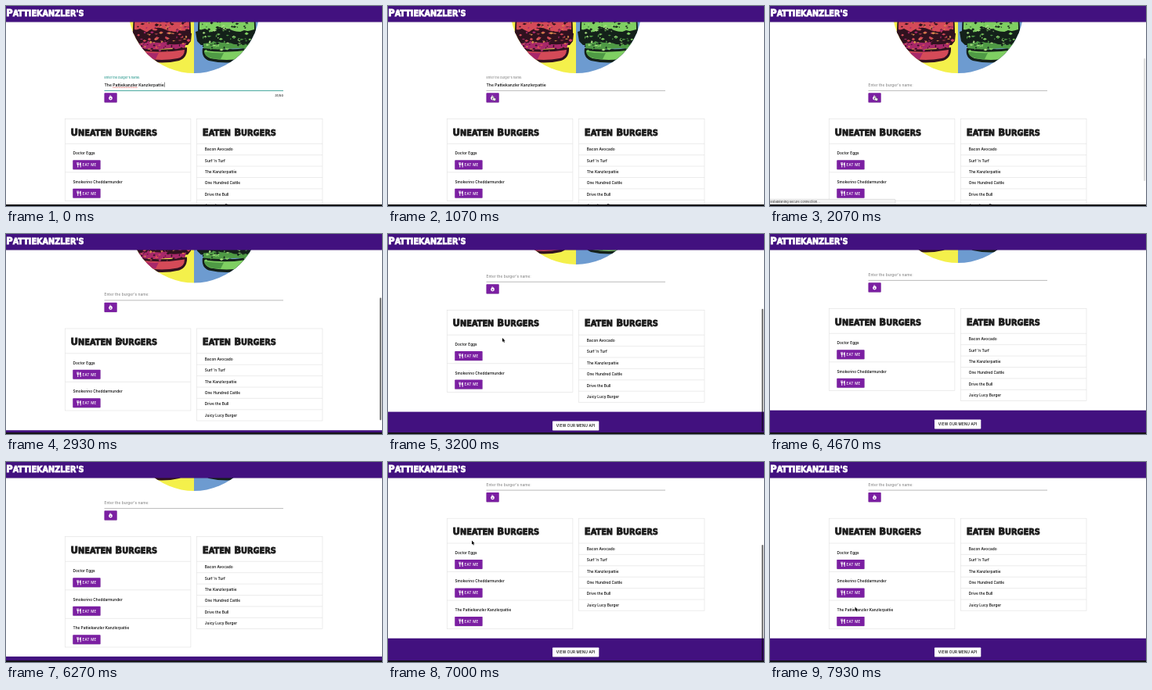
Animation of 480 by 256 pixels, one loop 8000 ms. Source, as an HTML page:

```html
<!DOCTYPE html>
<html lang="en">
<head>
<meta charset="utf-8">
<title>Burger list</title>
<style>
  html, body { margin: 0; width: 100%; height: 100%; overflow: hidden; background: #fff; }
  svg { display: block; width: 480px; height: 256px; }
  text { font: 450 4.8px Inter, "Open Sans", sans-serif; fill: #000; white-space: pre; }
  .caps { font-family: "DejaVu Sans", Roboto, sans-serif; font-weight: 700; stroke-width: .8; stroke-linejoin: miter; }
  .btn { font-size: 4.6px; font-weight: 500; letter-spacing: .17px; }
  .card { fill: #fff; stroke: #e2e2e2; stroke-width: .65; }
  .rule { stroke: #e2e2e2; stroke-width: .65; }
</style>
</head>
<body>
<svg id="stage" viewBox="0 0 480 256" xmlns="http://www.w3.org/2000/svg">
  <defs>
    <clipPath id="disc"><circle cx="240" cy="2" r="84"/></clipPath>
    <linearGradient id="shade" x2="0" y2="1">
      <stop offset="0" stop-color="#000" stop-opacity=".16"/>
      <stop offset="1" stop-color="#000" stop-opacity="0"/>
    </linearGradient>
  </defs>
  <rect width="480" height="256" fill="#fff"/>
  <g id="page"></g>
  <rect y="20.5" width="480" height="1.2" fill="url(#shade)"/>
  <rect width="480" height="20.5" fill="#42117f"/>
  <g id="top"></g>
</svg>
<script>
const LOOP = 8000;
const PURPLE = '#42117f', BUTTON = '#7b1fa2', TEAL = '#2c9a8f', GREY = '#8c8c8c';
const FULL_NAME = 'The Pattiekanzler Kanzlerpattie';
const uneaten = ['Doctor Eggs', 'Smokerino Cheddarmunder', FULL_NAME];
const eaten = ['Bacon Avocado', "Surf 'n Turf", 'The Kanzlerpattie',
  'One Hundred Cattle', 'Drive the Bull', 'Juicy Lucy Burger'];

const page = document.getElementById('page');
const chrome = document.getElementById('top');

function add(parent, tag, attrs = {}, content) {
  const node = document.createElementNS('http://www.w3.org/2000/svg', tag);
  set(node, attrs);
  if (content !== undefined) node.textContent = content;
  parent.appendChild(node);
  return node;
}
function set(node, attrs) {
  for (const key in attrs) node.setAttribute(key, attrs[key]);
}
const show = (node, on) => set(node, { visibility: on ? 'visible' : 'hidden' });
const rect = (parent, x, y, width, height, attrs) =>
  add(parent, 'rect', { x, y, width, height, ...attrs });
const rule = (parent, x1, x2, y, attrs) =>
  add(parent, 'line', { x1, x2, y1: y, y2: y, class: 'rule', ...attrs });
const label = (parent, x, y, content, attrs) => add(parent, 'text', { x, y, ...attrs }, content);

// Capital initials with smaller capitals for the rest of each word.
function smallCaps(parent, x, y, words, big, small, color) {
  const text = add(parent, 'text', { x, y, class: 'caps', style: `fill:${color};stroke:${color}` });
  words.split(' ').forEach((word, i) => {
    add(text, 'tspan', { style: `font-size:${big}px` }, (i ? ' ' : '') + word[0]);
    add(text, 'tspan', { style: `font-size:${small}px` }, word.slice(1).toUpperCase());
  });
}

function button(parent, x, y, w, h, fill) {
  rect(parent, x, y + .5, w, h, { rx: .7, fill: '#000', opacity: .16 });
  return rect(parent, x, y, w, h, { rx: .7, fill });
}

function seeded(seed) {
  return () => (seed = seed * 16807 % 2147483647) / 2147483647;
}

function burger(x, bun, meat, dark, light) {
  const g = add(art, 'g', { transform: `translate(${x} 0)` });
  const shape = (d, fill) => add(g, 'path', { d, fill });
  shape('M-37 36Q-38-24 0-24T37 36Z', dark);
  shape('M-35 30Q-36-21 0-21T35 30Q16 36 4 30T-20 34Z', bun);
  shape('M-40 33L-28 29L-16 35L-4 31L10 36L22 31L38 35L37 45L33 50H-33L-38 45Z', dark);
  shape('M-30 48Q-10 45 4 48T31 47L29 55Q8 53-6 56T-30 55Z', meat);
  shape('M-31 54Q0 58 32 53Q33 66 22 70Q0 75-23 70Q-33 66-31 54Z', dark);
  shape('M-29 57Q0 61 29 56Q29 65 20 67Q0 71-21 67Q-29 64-29 57Z', bun);
  shape('M-29 58Q-14 61-4 60L-8 68Q-28 68-29 58Z', meat);

  // Ragged printed texture
  const random = seeded(Math.round(x));
  const inks = [dark, dark, meat, light, bun];
  for (let i = 0; i < 150; i++) {
    const px = (random() - .5) * 64, py = 20 + random() * 38;
    const w = 1 + random() * 5, h = .6 + random() * 1.8;
    shape(`M${px} ${py}l${w * .4} ${-h}l${w * .6} ${h * .7}l${-w * .5} ${h}Z`, inks[i % inks.length]);
  }
}

// Picture
const art = add(page, 'g', { 'clip-path': 'url(#disc)' });
rect(art, 150, -90, 90, 180, { fill: '#f4f04b' });
rect(art, 240, -90, 90, 180, { fill: '#6d9bd0' });
burger(199, '#d44a58', '#a8286a', '#30121f', '#d98a4a');
burger(282, '#7fcf62', '#4f9a45', '#14211a', '#a8dc80');

// Form
const hint = label(page, 125.5, 102.9, "Enter the burger's name:");
const entry = add(page, 'g');
const typed = label(entry, 125.5, 102.6, FULL_NAME, { style: 'font-size:5.1px' });
const squiggle = rule(entry, 0, 0, 104.2, { style: 'stroke:#e03030;stroke-width:.7;stroke-dasharray:1 .5' });
const caret = rect(entry, 0, 97.6, .5, 6.2, { fill: '#222' });
const counter = label(page, 354, 115.8, '31/50', { 'text-anchor': 'end', style: 'font-size:4px;fill:#222' });
const line = rule(page, 125.5, 354, 108.4);
const submit = button(page, 125.5, 111.3, 16.2, 12.2, BUTTON);
const ripple = add(page, 'circle', { cx: 134, cy: 117.4, fill: '#fff' });
const flame = add(page, 'g', { transform: 'translate(133.5 117.3)' });
add(flame, 'path', {
  fill: '#fff',
  d: 'M-.6-3.5C.2-2.7.3-1.9.2-1.2C.8-1.3 1-1.7 1.1-2.1C2-1.1 2.4-.1 2.4.8A2.4 2.4 0 0 1-2.4.8C-2.4-.8-.4-1.6-.6-3.5Z'
});
add(flame, 'circle', { cy: 1.2, r: .8, fill: BUTTON });

// Lists
const leftCard = rect(page, 75.3, 144.5, 160.6, 105, { class: 'card' });
rect(page, 243.4, 144.5, 160.6, 118, { class: 'card' });
smallCaps(page, 82.5, 165.6, 'Uneaten Burgers', 11.7, 9.8, '#1c1c1c');
smallCaps(page, 250.7, 165.6, 'Eaten Burgers', 11.7, 9.8, '#1c1c1c');
rule(page, 75.3, 235.9, 176.3);

const rows = uneaten.map((name, i) => {
  const g = add(page, 'g', { transform: `translate(0 ${i * 36.5})` });
  if (i) rule(g, 75.3, 235.9, 176.3);
  label(g, 85.5, 190.2, name);
  button(g, 85.3, 197.2, 35.3, 12, BUTTON);
  add(g, 'path', {
    transform: 'translate(90.5 200)', fill: '#fff',
    d: 'M0 0H.6V2H1V0H1.6V2H2V0H2.6V2.4Q2.6 3.2 1.8 3.4V6.4H.8V3.4Q0 3.2 0 2.4ZM5.2 0V6.4H4.2V3.8H3.4V1.8Q3.6.4 5.2 0Z'
  });
  label(g, 97.6, 205.1, 'EAT ME', { class: 'btn', style: 'fill:#fff' });
  return g;
});
eaten.forEach((name, i) => {
  rule(page, 243.4, 404, 176.3 + i * 14.4);
  label(page, 253.8, 185.2 + i * 14.4, name);
});

const footer = add(page, 'g');
rect(footer, 0, 0, 480, 90, { fill: PURPLE });
button(footer, 210, 11.8, 59.3, 12, '#fff');
label(footer, 239.7, 19.4, 'VIEW OUR MENU API', { class: 'btn', 'text-anchor': 'middle' });

// Window parts above the page
smallCaps(chrome, .2, 13.3, "Pattiekanzler's", 11.5, 9.7, '#fff');
const thumb = rect(chrome, 477, 0, 2.2, 150, { rx: 1.1, fill: '#000' });
const status = add(chrome, 'g');
rect(status, -2, 247.4, 162, 9, { rx: 1, fill: '#f3f3f3', stroke: '#c4c4c4', 'stroke-width': .5 });
label(status, .5, 252.4, 'Establishing secure connection...', { style: 'font-size:4px;fill:#444' });
rect(chrome, 0, 254, 480, 2, { fill: '#141216' });
const arrow = add(chrome, 'path', {
  d: 'M0 0V5L1.2 4L2 5.9L2.9 5.5L2.1 3.7H3.6Z', fill: '#000', stroke: '#fff', 'stroke-width': .5, 'paint-order': 'stroke'
});
const hand = add(chrome, 'path', {
  d: 'M0 0Q.7-.6 1.1.2V2.2L3.4 2.7Q3.9 2.9 3.7 3.8L3.2 5.8H.8L-1 3.5Q-.8 2.8-.1 3.3Z',
  fill: '#fff', stroke: '#222', 'stroke-width': .45
});

const clamp = x => Math.max(0, Math.min(1, x));
const span = (t, a, b) => clamp((t - a) / (b - a));
const out = (p, power = 2) => 1 - (1 - p) ** power;
const smooth = p => p * p * (3 - 2 * p);
const mix = (a, b, p) => a + (b - a) * p;

// time, x, y
const route = [
  [70, 147, 126], [330, 147, 125], [530, 134, 115.5], [2070, 134, 115.5], [2530, 146, 133],
  [3670, 146, 133], [4400, 120, 84], [4530, 120, 84], [4670, 112, 22],
  [6270, 112, 22], [6670, 107, 100.5], [7000, 107, 100.5], [7670, 104, 108], [7930, 108.6, 185.5]
];
function pointer(t) {
  const i = route.findIndex(stop => stop[0] > t);
  if (i === 0) return route[0].slice(1);
  if (i < 0) return route[route.length - 1].slice(1);
  const a = route[i - 1], b = route[i], p = smooth(span(t, a[0], b[0]));
  return [mix(a[1], b[1], p), mix(a[2], b[2], p)];
}

// The page ends 23.3 lower once the third row exists.
const END = 49, GROWTH = 23.3;
const scrollAt = t =>
  END * out(span(t, 2800, 3330), 2.3) + GROWTH * out(span(t, 6800, 7000));

function thumbAlpha(t) {
  if (t < 2700) return .5 * span(t, 2030, 2180) * (1 - span(t, 2350, 2530));
  if (t < 6000) return t < 2800 ? 0 : .53 * (1 - span(t, 3700, 3950));
  return t < 6800 ? 0 : .53 * (1 - span(t, 7700, 7920));
}

function draw(t) {
  const scroll = scrollAt(t);
  const added = t >= 6270;
  set(page, { transform: `translate(0 ${-scroll})` });

  const focused = t < 530;
  const cleared = t >= 1130;
  const drop = out(span(t, 1130, 1330));
  hint.style.fontSize = mix(3.88, 4.85, drop) + 'px';
  hint.style.fill = focused ? TEAL : GREY;
  set(hint, { y: mix(93, 102.9, drop) });
  line.style.stroke = focused ? TEAL : GREY;
  line.style.strokeWidth = focused ? .9 : .6;
  show(entry, !cleared);
  caret.style.opacity = focused ? 1 : 0;
  squiggle.style.opacity = focused ? 1 : 0;
  show(counter, focused);

  const wave = span(t, 560, 1130);
  set(ripple, { r: 6 * out(wave), opacity: wave > 0 ? .35 * (1 - wave) : 0 });

  show(rows[2], added);
  set(leftCard, { height: added ? 141.5 : 105 });
  set(footer, { transform: `translate(0 ${274.7 + (added ? GROWTH : 0)})` });

  const barLength = added ? 148 : 157;
  const travel = scroll / (END + (added ? GROWTH : 0));
  set(thumb, {
    y: mix(added ? 60 : 67, 254 - barLength, travel),
    height: barLength, opacity: thumbAlpha(t)
  });
  show(status, t >= 1200 && t < 2500);

  const [x, y] = pointer(t);
  const inside = t >= 70 && t < 4670 || t > 6300;
  const onButton = t < 2800 && x < 141.7 && y < 123.5;
  for (const [node, on] of [[arrow, inside && !onButton], [hand, inside && onButton]]) {
    set(node, { transform: `translate(${x} ${y})` });
    show(node, on);
  }
}

// Caret and spelling mark follow the rendered text.
const wordStart = 125.5 + typed.getSubStringLength(0, 4);
set(squiggle, { x1: wordStart, x2: wordStart + typed.getSubStringLength(4, 13) });
set(caret, { x: 125.7 + typed.getComputedTextLength() });

const start = performance.now();
function tick() {
  draw((performance.now() - start) % LOOP);
  requestAnimationFrame(tick);
}
tick();
</script>
</body>
</html>
```
